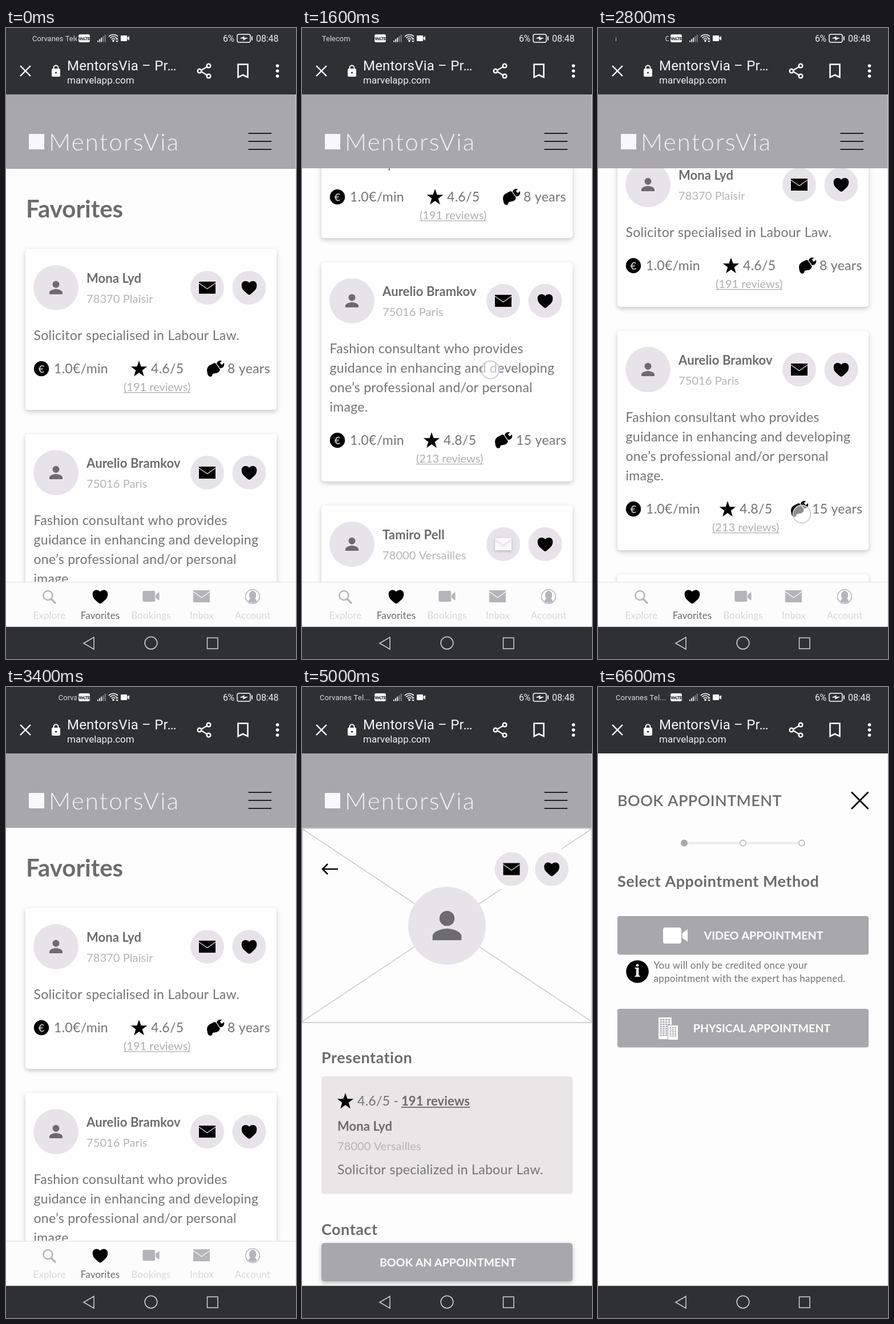
These frames come from a looping animation (508 by 1102 pixels, 8 s). An HTML page with a canvas:

```html
<!DOCTYPE html>
<html lang="en">
<head>
<meta charset="utf-8">
<title>Expert booking app</title>
<style>
html, body { margin: 0; width: 100%; height: 100%; overflow: hidden; background: #fdfdfd; }
canvas { display: block; width: 508px; height: 1102px; }
</style>
</head>
<body>
<canvas id="stage" width="508" height="1102"></canvas>
<script>
const W = 508, H = 1102, TOP = 116, BOTTOM = 1046;
const LOOP = 8000, STEP = 200;
const ctx = document.getElementById('stage').getContext('2d');

const DARK = '#2f3034', PAPER = '#fdfdfd', GREY = '#a8a7ac', INK = '#6c6b6e', BODY = '#757378',
      PALE = '#b5b4b8', DISC = '#e6e4e8', FAINT = '#d9d8dc', BLACK = '#020202', WHITE = '#fff';
const APP = 'MentorsVia', CARRIER = 'Corvanes Telecom';

const lato = (size, weight = 400) => `${weight} ${size}px Lato, sans-serif`;
const roboto = (size, weight = 400) => `${weight} ${size}px Roboto, sans-serif`;
const TYPE = {
  body: [lato(23), BODY, 0.3],
  name: [lato(22, 700), INK, 0.1],
  city: [lato(20), PALE, 0.1],
  heading: [lato(27, 700), INK, 0.5],
  button: [lato(19.6, 700), WHITE, 0],
  note: [lato(17), BODY, 0.25]
};

// ---- drawing helpers ----
function text(str, x, y, [font, color, spacing = 0], align = 'left') {
  ctx.font = font;
  ctx.fillStyle = color;
  ctx.letterSpacing = spacing + 'px';
  ctx.textAlign = align;
  ctx.fillText(str, x, y);
  return ctx.measureText(str).width;
}

function rect(x, y, w, h, color) {
  ctx.fillStyle = color;
  ctx.fillRect(x, y, w, h);
}

function round(x, y, w, h, r, color) {
  ctx.fillStyle = color;
  ctx.beginPath();
  ctx.roundRect(x, y, w, h, r);
  ctx.fill();
}

function disc(x, y, r, color) {
  ctx.fillStyle = color;
  ctx.beginPath();
  ctx.arc(x, y, r, 0, 7);
  ctx.fill();
}

function ring(x, y, r, color, width) {
  ctx.strokeStyle = color;
  ctx.lineWidth = width;
  ctx.beginPath();
  ctx.arc(x, y, r, 0, 7);
  ctx.stroke();
}

function placed(x, y, scale, draw) {
  ctx.save();
  ctx.translate(x, y);
  ctx.scale(scale, scale);
  draw();
  ctx.restore();
}

function shape(d, color, x = 0, y = 0, scale = 1) {
  placed(x, y, scale, () => {
    ctx.fillStyle = color;
    ctx.fill(new Path2D(d));
  });
}

function line(d, color, width, x = 0, y = 0) {
  placed(x, y, 1, () => {
    ctx.strokeStyle = color;
    ctx.lineWidth = width;
    ctx.stroke(new Path2D(d));
  });
}

function shadowed(blur, dy, alpha, draw) {
  ctx.save();
  ctx.shadowColor = `rgba(0,0,0,${alpha})`;
  ctx.shadowBlur = blur;
  ctx.shadowOffsetY = dy;
  draw();
  ctx.restore();
}

function clipped(x, y, w, h, draw) {
  ctx.save();
  ctx.beginPath();
  ctx.rect(x, y, w, h);
  ctx.clip();
  draw();
  ctx.restore();
}

// ---- icons ----
const HEART = 'M0 12.5C-2.5 12-5 9-8.5 6C-12 3-13.3-.5-13.3-4.5C-13.3-9-10-11.5-6.5-11.5C-3.8-11.5-1.2-10.5 0-8.5' +
              'C1.2-10.5 3.8-11.5 6.5-11.5C10-11.5 13.3-9 13.3-4.5C13.3-.5 12 3 8.5 6C5 9 2.5 12 0 12.5Z';
const heart = (x, y, color = BLACK) => shape(HEART, color, x, y);

function envelope(x, y, color = BLACK, flap = DISC) {
  rect(x - 14.5, y - 10.5, 29, 21, color);
  line('M-14.5-8L0 2L14.5-8', flap, 1.1, x, y);
}

function person(x, y, scale) {
  placed(x, y, scale, () => {
    disc(0, -5.7, 6, INK);
    shape('M-11.5 11.6V8.5C-11.5 4.5-4 2.4 0 2.4C4 2.4 11.5 4.5 11.5 8.5V11.6Z', INK);
  });
}

function star(x, y) {
  ctx.fillStyle = BLACK;
  ctx.beginPath();
  for (let i = 0; i < 10; i++) {
    const r = i % 2 ? 6 : 15, a = i * Math.PI / 5;
    ctx.lineTo(x + r * Math.sin(a), y + 1 - r * Math.cos(a));
  }
  ctx.fill();
}

function euro(x, y) {
  disc(x, y, 13.2, BLACK);
  text('€', x, y + 6.5, [lato(18, 500), FAINT], 'center');
}

function wrench(x, y) {
  disc(x + 8.5, y - 7.5, 6.8, BLACK);
  line('M9.5-8.5L17-16', WHITE, 5, x, y);
  shape('M-15 3Q-15-3-10-6L-2-10Q4-9 6-4Q9 0 7 4Q4 8 0 8L-5 9Q-5 12-8 14Q-13 14-14 9Z', BLACK, x, y);
  line('M0-11L9 2', WHITE, 1.3, x, y);
}

function camera(x, y, scale, color) {
  placed(x, y, scale, () => {
    round(-21.5, -14, 32, 28, 4, color);
    shape('M12-4L21.5-11V11L12 4Z', color);
  });
}

function building(x, y, w, h, cols, rows) {
  round(x - 1, y - 1, w + 2, h + 2, 1, GREY);
  round(x, y, w, h, 1, WHITE);
  const dx = (w - 4) / cols, dy = (h - 7) / rows;
  for (let i = 0; i < cols; i++)
    for (let j = 0; j < rows; j++) rect(x + 2.5 + i * dx, y + 3 + j * dy, dx - 1.3, dy - 1.5, GREY);
}

function contactButtons(x1, x2, y, active = true) {
  disc(x1, y, 29.5, DISC);
  disc(x2, y, 29.5, DISC);
  if (active) envelope(x1, y);
  else shadowed(5, 2, 0.2, () => envelope(x1, y, '#fbfafc', FAINT));
  heart(x2, y);
}

// ---- phone frame ----
function carrier(t) {
  const style = [roboto(13), '#dcdcde'];
  if (t >= 5000) return text(CARRIER.slice(0, 12) + '...', 31, 22.5, [roboto(13), '#dcdcde', 0.2]);
  const x = 46 - 43 * t / 1000;
  clipped(31, 8, 93, 20, () => [x, x + 192].forEach(left => text(CARRIER, left, 22.5, style)));
}

function statusBar(t) {
  carrier(t);
  round(127, 11, 20, 14, 3, '#f0f0f0');
  text('VoLTE', 137, 21, [roboto(7.5, 900), DARK, -0.3], 'center');
  for (let i = 0; i < 5; i++) rect(160 + i * 3.2, 22 - i * 2.6, 1.8, 2.5 + i * 2.6, i < 3 ? WHITE : '#88888b');
  for (const r of [4.5, 8, 11.5]) {
    ctx.strokeStyle = WHITE;
    ctx.lineWidth = 1.7;
    ctx.beginPath();
    ctx.arc(188, 23, r, -2.35, -0.8);
    ctx.stroke();
  }
  disc(188, 22.5, 1.8, WHITE);
  shape('M192 20h5l-2.5-3zM192 22h5l-2.5 3z', WHITE);
  camera(208.5, 18, 0.35, WHITE);
  text('6%', 380, 24, [roboto(16), '#f0f0f0', -0.4]);
  ctx.strokeStyle = WHITE;
  ctx.lineWidth = 1.5;
  ctx.beginPath();
  ctx.roundRect(405, 11, 23, 14, 3);
  ctx.stroke();
  rect(430, 14.5, 1.8, 7, WHITE);
  shape('M409 18.5L418 14L417 17H424L415 22L416 18.5Z', WHITE);
  text('08:48', 438, 24, [roboto(16), '#f0f0f0', -0.1]);
}

function browserBar() {
  line('M25 66L43 84M43 66L25 84', WHITE, 2.4);
  round(80, 71, 15, 14, 2, WHITE);
  line('M83.5 72V69.5a4 4 0 0 1 8 0V72', WHITE, 2);
  disc(87.5, 78, 1.6, DARK);
  text(APP + ' – Pr…', 107, 73.5, [roboto(24), '#f5f5f5', 0.2]);
  text('marvelapp.com', 107, 97, [roboto(17), '#f0f0f0']);
  line('M355 66L340 75L355 84', WHITE, 2.2);
  for (const [x, y] of [[355, 66], [339, 75], [355, 84]]) {
    disc(x, y, 4.6, WHITE);
    disc(x, y, 2, DARK);
  }
  line('M406.5 63.5H423.5V86L415 82L406.5 86Z', WHITE, 2.5);
  [66, 75, 84].forEach(y => disc(475.5, y, 2.8, WHITE));
}

function phone(t) {
  rect(0, 0, W, TOP, DARK);
  rect(0, BOTTOM, W, H - BOTTOM, DARK);
  statusBar(t);
  browserBar();
  line('M154 1064V1085L136 1074.5Z', '#d2d2d4', 1.5);
  ring(254, 1074, 10.8, '#d2d2d4', 1.5);
  line('M352.5 1065H371V1084H352.5Z', '#d2d2d4', 1.5);
}

function header(bottom) {
  rect(0, TOP, W, bottom - TOP, GREY);
  rect(40, 185, 27, 27, '#f8f7fa');
  text(APP, 75, 214, [lato(42, 300), '#f4f3f6', 2.2]);
  for (const y of [184, 198, 212]) rect(424.5, y - 1, 40.5, 2, '#232126');
}

// ---- favourites list ----
const CARDS = [
  { top: 386, name: 'Mona Lyd', city: '78370 Plaisir', about: ['Solicitor specialised in Labour Law.'],
    price: '1.0', score: '4.6/5', reviews: '(191 reviews)', years: '8 years', starX: 233, reviewX: 206, toolX: 367, yearX: 388 },
  { top: 709, name: 'Aurelio Bramkov', city: '75016 Paris',
    about: ['Fashion consultant who provides', 'guidance in enhancing and developing',
            'one’s professional and/or personal', 'image.'],
    price: '1.0', score: '4.8/5', reviews: '(213 reviews)', years: '15 years', starX: 227, reviewX: 200, toolX: 353, yearX: 375 },
  { top: 1134, name: 'Tamiro Pell', city: '78000 Versailles', about: ['Life Coach'],
    price: '0.9', score: '5/5', reviews: '(4 reviews)', years: '1 year', starX: 233, reviewX: 207, toolX: 367, yearX: 389, away: true }
];

function card(c) {
  const extra = (c.about.length - 1) * 34;
  placed(0, c.top, 1, () => {
    shadowed(9, 3, 0.22, () => round(34, 0, 440, 281 + extra, 5, '#fefefe'));
    disc(87.5, 67.5, 39.5, DISC);
    person(87.5, 67.5, 1);
    text(c.name, 141, 59, TYPE.name);
    text(c.city, 141, 93.5, TYPE.city);
    contactButtons(352.5, 426, 67.5, !c.away);
    c.about.forEach((s, i) => text(s, 48.5, 158.5 + i * 34, TYPE.body));
    const y = 209 + extra;
    euro(62, y);
    text(c.price + '€/min', 84, y + 7.5, TYPE.body);
    star(c.starX, y);
    text(c.score, c.starX + 21, y + 7.5, TYPE.body);
    wrench(c.toolX, y);
    text(c.years, c.yearX, y + 7.5, TYPE.body);
    const w = text(c.reviews, c.reviewX, y + 38.5, [lato(20), '#b0afb3']);
    rect(c.reviewX, y + 41, w, 1.3, '#b0afb3');
  });
}

function tabs() {
  rect(0, 967, W, BOTTOM - 967, '#fcfcfc');
  rect(0, 967, W, 1.5, '#e8e8ea');
  ['Explore', 'Favorites', 'Bookings', 'Inbox', 'Account'].forEach((label, i) =>
    text(label, 76 + i * 89, 1031.5, [lato(17), i === 1 ? INK : FAINT, 0.1], 'center'));
  ring(73.5, 991, 8, PALE, 2.4);
  line('M79 997L87 1005', PALE, 3.2);
  heart(165, 993);
  camera(254, 992.5, 0.68, PALE);
  envelope(342.5, 992.5, PALE, '#fcfcfc');
  ring(432, 993, 12.3, PALE, 1.6);
  shape('M425 1002Q424 999 428 997Q425 993 426 988Q428 983 432 983Q436 983 438 988' +
        'Q439 993 436 997Q440 999 439 1002Q432 1006 425 1002Z', PALE);
}

function listPage(scroll) {
  const edge = scroll ? 245 : 246;
  clipped(0, edge, W, 968 - edge, () => {
    ctx.translate(0, -scroll);
    text('Favorites', 35, 331, [lato(42, 700), INK]);
    CARDS.forEach(card);
  });
  header(edge);
  tabs();
}

// ---- expert details ----
function detailPage() {
  header(246);
  line('M.7 247H507.3V586H.7ZM.7 248L507 584M507 248L.7 584', '#c4c1c5', 1.5);
  rect(335, 283, 134, 70, PAPER);
  line('M63 318H37M45 309L36 318L45 327', BLACK, 2.5);
  contactButtons(367, 437.5, 318);
  disc(254, 417, 68, DISC);
  person(254, 416.7, 2.2);

  text('Presentation', 34, 657, TYPE.heading);
  round(34, 680, 440, 205.5, 5, '#e8e6e7');
  star(76, 723);
  text('4.6/5 -', 97, 731, TYPE.body);
  const w = text('191 reviews', 174, 731, TYPE.name);
  rect(174, 733, w, 1.8, INK);
  text(CARDS[0].name, 62, 774.5, TYPE.name);
  text('78000 Versailles', 62, 808.5, TYPE.city);
  text('Solicitor specialized in Labour Law.', 62, 851, TYPE.body);

  text('Contact', 34, 956.5, TYPE.heading);
  shadowed(8, 3, 0.25, () => round(34, 971, 440, 67, 5, GREY));
  text('BOOK AN APPOINTMENT', 255.5, 1012, TYPE.button, 'center');
}

// ---- booking sheet ----
function bookingSheet(dy) {
  placed(0, dy, 1, () => {
    shadowed(30, -3, dy ? 0.35 : 0, () => rect(0, TOP, W, BOTTOM - TOP, PAPER));
    text('BOOK APPOINTMENT', 34, 207.5, [lato(27, 600), INK, 0.4]);
    line('M444 183.5L473.5 213M473.5 183.5L444 213', '#151317', 3);
    rect(151, 270, 206, 5, '#eeedf0');
    disc(151, 272.5, 6, GREY);
    for (const x of [254, 357]) {
      disc(x, 272.5, 5, PAPER);
      ring(x, 272.5, 5, '#bebdc1', 1.8);
    }
    text('Select Appointment Method', 34, 349, TYPE.heading);

    round(34, 400, 440, 67.5, 4, GREY);
    camera(135.5, 434, 1, WHITE);
    text('VIDEO APPOINTMENT', 290, 441, TYPE.button, 'center');
    disc(69, 497, 19.8, BLACK);
    text('i', 69, 506, ['700 29px "Noto Serif", serif', WHITE], 'center');
    text('You will only be credited once your', 97.5, 492, TYPE.note);
    text('appointment with the expert has happened.', 97.5, 514.5, TYPE.note);

    round(34, 562, 440, 67.5, 4, GREY);
    building(106, 577, 23, 38, 4, 8);
    building(123, 591, 17, 25, 3, 5);
    text('PHYSICAL APPOINTMENT', 287, 603, TYPE.button, 'center');
  });
}

// ---- motion ----
function along(keys, t) {
  let [t0, v0] = keys[0];
  for (const [t1, v1] of keys) {
    if (t < t1) return t <= t0 ? v0 : v0 + (v1 - v0) * (t - t0) / (t1 - t0);
    [t0, v0] = [t1, v1];
  }
  return v0;
}

// Same curve as the CSS "ease" keyword
function ease(p) {
  if (p <= 0 || p >= 1) return p <= 0 ? 0 : 1;
  const curve = (a, b, s) => 3 * a * s * (1 - s) ** 2 + 3 * b * s * s * (1 - s) + s ** 3;
  let lo = 0, hi = 1;
  for (let i = 0; i < 20; i++) {
    const mid = (lo + hi) / 2;
    if (curve(0.25, 0.25, mid) < p) lo = mid; else hi = mid;
  }
  return curve(0.1, 1, lo);
}

const SHEET_START = 6052.4, SHEET_TIME = 400;
const SCROLL = [[1000, 0], [1200, 12], [1400, 130], [1600, 300], [1800, 425], [2000, 478], [2200, 490],
                [2400, 490], [2600, 400], [2800, 180], [3000, 30], [3200, 0]];
const TOUCHES = [
  { x: 330, path: [[1200, 885], [1400, 767], [1600, 597]] },
  { x: 357, path: [[2400, 539], [2600, 629], [2800, 849], [3000, 970]] },
  { x: 200, path: [[3800, 470]] },
  { x: 254, path: [[6000, 1004]] }
];

function touches(t) {
  for (const { x, path } of TOUCHES) {
    if (t < path[0][0] || t > path[path.length - 1][0]) continue;
    const y = along(path, t);
    disc(x, y, 15.5, 'rgba(255,255,255,.55)');
    ring(x, y, 15.5, '#cdc9dc', 1.8);
  }
}

function draw(t) {
  rect(0, 0, W, H, PAPER);
  clipped(0, TOP, W, BOTTOM - TOP, () => {
    if (t < 4200) listPage(along(SCROLL, t));
    else detailPage();
    if (t > SHEET_START) {
      const shown = ease((t - SHEET_START) / SHEET_TIME);
      bookingSheet(Math.round((BOTTOM - TOP) * (1 - shown)));
    }
    rect(507, TOP, 1, BOTTOM - TOP, 'rgba(225,225,228,.7)');
    rect(0, BOTTOM - 2, W, 2, 'rgba(200,200,204,.4)');
    touches(t);
  });
  phone(t);
}

const start = performance.now();
function tick() {
  const t = (performance.now() - start) % LOOP;
  draw(Math.floor(t / STEP) * STEP);
  requestAnimationFrame(tick);
}
tick();
</script>
</body>
</html>
```
